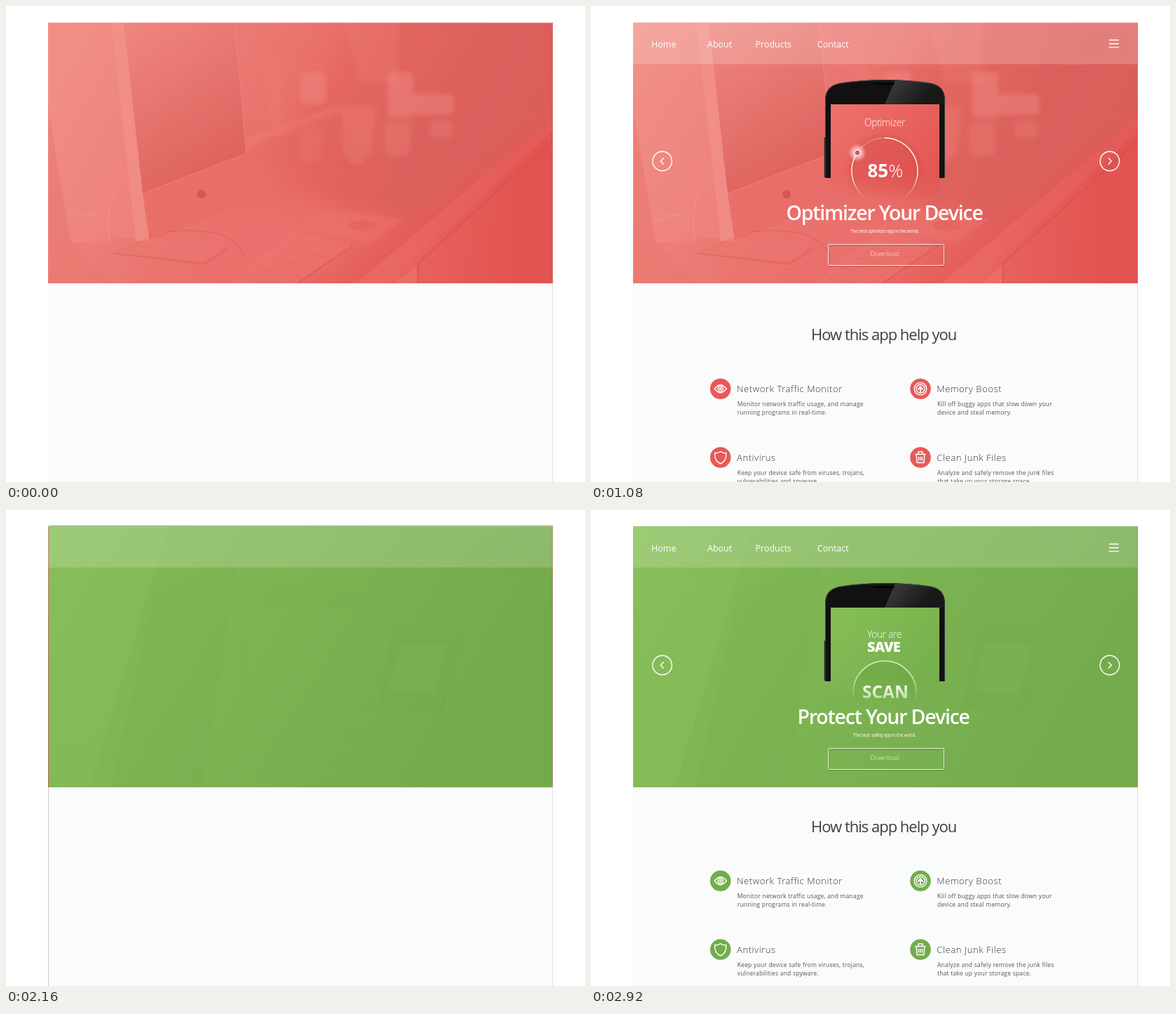
Recreate the animation shown at these times as an HTML page. Size 826x678 px, loop 3.88 s.

```html
<!DOCTYPE html>
<html lang="en">
<head>
<meta charset="utf-8">
<title>App landing page</title>
<style>
html, body { margin: 0; width: 100%; height: 100%; overflow: hidden; background: #fff; }
svg { display: block; font-family: "Open Sans", sans-serif; fill: none; }
text { fill: #fff; white-space: pre; }
.nav { font-size: 12.5px; }
.title { font-size: 28.5px; font-weight: 600; letter-spacing: -1.2px; }
.sub { font-size: 6.5px; letter-spacing: -.32px; }
.button { font-size: 9.2px; font-weight: 300; }
.heading { font-size: 22px; letter-spacing: -1px; fill: #3f3d40; }
.name { font-size: 13.1px; font-weight: 300; letter-spacing: .55px; fill: #333; }
.body { font-size: 8.5px; letter-spacing: .22px; fill: #555; }
.thin { font-size: 14px; font-weight: 300; letter-spacing: -.45px; }
.big { font-size: 26px; font-weight: 700; }
.line { stroke: #fff; stroke-width: 1.4; }
</style>
</head>
<body>
<svg id="stage" width="826" height="678" viewBox="0 0 826 678"></svg>
<script>
const LOOP = 3880, STEP = 40, SLIDE_START = 1760, SLIDE_TIME = 420;

const gradient = (id, from, to, x1, y1, x2, y2) =>
  `<linearGradient id="${id}" gradientUnits="userSpaceOnUse" x1="${x1}" y1="${y1}" x2="${x2}" y2="${y2}">
   <stop stop-color="${from}"/><stop offset="1" stop-color="${to}"/></linearGradient>`;
const blur = (id, size) =>
  `<filter id="${id}" x="-50%" y="-50%" width="200%" height="200%"><feGaussianBlur stdDeviation="${size}"/></filter>`;
const text = (cls, x, y, content, extra = '') => `<text class="${cls}" x="${x}" y="${y}" ${extra}>${content}</text>`;
const shape = (fill, d, opacity = 1) => `<path fill="${fill}" opacity="${opacity}" d="${d}"/>`;
const stroke = (color, d, opacity = 1, width = 1) =>
  `<path stroke="${color}" stroke-width="${width}" opacity="${opacity}" d="${d}"/>`;

const defs = `<defs>
  ${gradient('redHero', '#f08c84', '#e25351', 60, 60, 680, 400)}
  ${gradient('redScreenshot', '#ee857d', '#dc5f5b', 180, 30, 300, 240)}
  ${gradient('redWall', '#e66762', '#d9605c', 480, 30, 640, 130)}
  ${gradient('redDesk', '#ea6a66', '#e15350', 540, 330, 740, 330)}
  ${gradient('greenHero', '#86bd57', '#74ab4d', 60, 40, 640, 390)}
  ${gradient('redPhone', '#ee716c', '#e15451', 345, 140, 490, 270)}
  ${gradient('greenPhone', '#86be57', '#74ae4a', 345, 140, 490, 270)}
  ${gradient('shine', '#4b4b4b', '#1b1b1b', 430, 105, 470, 140)}
  ${gradient('fadeDown', '#fff', '#000', 0, 236, 0, 275)}
  ${gradient('scanText', '#fff', '#b4d695', 0, 248, 0, 272)}
  <linearGradient id="edge"><stop stop-color="#000" stop-opacity="0"/><stop offset="1" stop-color="#000" stop-opacity=".22"/></linearGradient>
  <radialGradient id="glow"><stop stop-color="#fff" stop-opacity=".9"/><stop offset=".35" stop-color="#fff" stop-opacity=".65"/><stop offset="1" stop-color="#fff" stop-opacity="0"/></radialGradient>
  <mask id="fade" maskUnits="userSpaceOnUse" x="330" y="90" width="180" height="200"><rect x="330" y="90" width="180" height="200" fill="url(#fadeDown)"/></mask>
  ${blur('soft', 3)}${blur('softer', 14)}
  <clipPath id="hero"><path d="M60 24H780V395H60Z"/></clipPath>
  <clipPath id="page"><path d="M60 22H780V678H60Z"/></clipPath>
</defs>`;

function keyboard() {
  let keys = '';
  for (let row = 0; row < 5; row++)
    keys += `M${412 - row * 19} ${330 + row * 14}l${74 - row * 3} 15`;
  for (let col = 0; col < 6; col++)
    keys += `M${420 + col * 13} ${331 + col * 2.6}l-82 60`;
  return stroke('#d95954', keys, .28);
}

// Tinted desk scene: monitor on the left, blurred objects and a table edge on the right.
const redBackdrop = `<g clip-path="url(#hero)">
  <rect x="60" y="24" width="720" height="371" fill="url(#redHero)"/>
  <g filter="url(#softer)">
    ${shape('url(#redWall)', 'M520 0H800V160L600 300L480 290L400 190Z', .8)}
    ${shape('#df605c', 'M345 200L470 150L560 280L440 300Z', .35)}
    ${shape('#ee7570', 'M300 300L420 270L560 310L420 400H220Z', .5)}
  </g>
  ${shape('#f4968d', 'M60 24H150L184 330L92 335L60 140Z', .28)}
  ${shape('#e9716b', 'M60 150L92 335L150 395H60Z', .3)}
  ${shape('#f3968e', 'M150 24H168L195 267L205 335H185Z', .65)}
  ${shape('url(#redScreenshot)', 'M168 24H326L343 210L195 267Z', .85)}
  ${shape('#e96d68', 'M195 267L343 210L348 278L205 335Z', .8)}
  ${stroke('#f28c85', 'M326 24L343 210M195 267L343 210', .6)}
  <circle cx="279" cy="268" r="6" fill="#c9504d" opacity=".75"/>
  ${shape('#df5d59', 'M152 350L212 326L318 345L284 368Z', .22)}
  ${shape('#f0807a', 'M155 351L215 328L314 343L282 364Z', .4)}
  ${stroke('#d75853', 'M152 352L282 368L318 346M225 322Q330 310 342 362', .5, 1.3)}
  ${stroke('#f6a39b', 'M148 334Q140 262 172 249M88 296L140 300M92 306L145 290M92 335H150', .4, 1.2)}
  ${shape('#f08079', 'M415 395L494 342L410 320L318 395Z', .25)}
  ${keyboard()}
  ${stroke('#d4534f', 'M416 395L494 342', .5, 2)}
  ${shape('#ee7771', 'M405 318L460 288L568 304L522 336Z', .35)}
  <ellipse cx="508" cy="313" rx="20" ry="8" fill="#df5a56" opacity=".4"/>
  <g filter="url(#soft)" fill="#f08882">
    <rect x="420" y="94" width="36" height="45" rx="6" opacity=".5"/>
    <rect x="544" y="94" width="37" height="65" rx="6" opacity=".5"/>
    <rect x="581" y="125" width="58" height="30" rx="6" opacity=".48"/>
    <path d="M480 143H528L522 210L500 228L480 210Z" opacity=".3"/>
    <rect x="540" y="164" width="37" height="50" rx="9" opacity=".28"/>
    <rect x="604" y="163" width="34" height="25" rx="6" opacity=".28"/>
    <rect x="418" y="172" width="34" height="50" rx="9" opacity=".2"/>
    <rect x="374" y="74" width="18" height="95" opacity=".18"/>
    <path d="M480 24H560V110H505Z" opacity=".22"/>
    <path d="M343 188L480 140V149L343 200Z" opacity=".35"/>
  </g>
  ${shape('url(#redDesk)', 'M500 395L780 158V395Z', .75)}
  ${shape('#ec6f6a', 'M500 395L780 158V178L545 395Z', .3)}
  ${stroke('#c94c4a', 'M588 366L780 192M588 366V395', .35, 2.5)}
  ${shape('#ef7d78', 'M556 395L586 370V395Z', .4)}
</g>
<path fill="#fafcfb" d="M60 395H780V678H60Z"/>
<path fill="#f4a39c" d="M60 23.5H780V24.3H60Z"/>`;

const greenBackdrop = `
<path fill="#fafcfb" d="M60 395H780V678H60Z"/>
<g>
  <rect x="60" y="23" width="720" height="372" fill="url(#greenHero)"/>
  <g clip-path="url(#hero)">
    ${shape('#9acb6e', 'M60 24H230L120 395H60Z', .12)}
    ${shape('#6fa548', 'M210 120L330 60L280 395H150Z', .12)}
    ${shape('#6da346', 'M553 164H650L620 288L530 278Z', .13)}
    ${shape('#83b95a', 'M562 192H628L612 262L544 256Z', .22)}
    ${stroke('#689e43', 'M530 278L620 288L650 178', .2, 2)}
  </g>
  <rect x="60" y="24" width="720" height="58" fill="#fff" opacity=".17"/>
  <path fill="#a3c883" d="M60 23H780V24H60Z"/>
</g>`;

const phoneBody = `
  ${shape('#111', 'M334 245V132Q335 114 354 110Q385 105 419 105Q455 105 486 110Q504 114 505 132V245H497V140H342V245Z')}
  ${shape('url(#shine)', 'M434 106Q462 106 485 110Q500 114 503 130V140H419Z', .75)}
  ${stroke('#4a4a4a', 'M334.500 245V132Q335.500 114.500 354 110.500Q385 105.700 419 105.700Q455 105.700 486 110.500Q503.500 114.500 504.500 132V245', .85)}
  <rect x="403" y="110" width="30" height="2" rx="1" fill="#000"/>
  <rect x="332.800" y="187" width="1.500" height="57" fill="#222"/>`;
const screenRect = fill => `<rect x="342" y="140" width="155" height="136" fill="url(#${fill})"/>`;

const redPhone = `${phoneBody}
  <g mask="url(#fade)">
    ${screenRect('redPhone')}
    <circle cx="419" cy="235" r="49" stroke="#b8383a" stroke-width="4" opacity=".35" filter="url(#soft)"/>
    <circle cx="419" cy="235" r="47" fill="#cf4646" opacity=".32"/>
    <circle class="line" cx="419" cy="235" r="47" opacity=".25"/>
    <path class="line" d="M419 188A47 47 0 1 1 380 208.800" opacity=".95"/>
    <circle cx="380" cy="209" r="13" fill="url(#glow)"/>
    <circle cx="380" cy="209" r="4" fill="#d95653" stroke="#fff"/>
  </g>
  ${text('thin', 390, 171, 'Optimizer')}
  ${text('big', 394.5, 244, '85<tspan font-weight="300">%</tspan>')}`;

const greenPhone = `<g transform="translate(0 -1)">${phoneBody}
  <g mask="url(#fade)">
    ${screenRect('greenPhone')}
    <circle cx="419" cy="261" r="45" fill="#5f9a3b" opacity=".3"/>
    <circle cx="419" cy="261" r="45" stroke="#d8ecc6" stroke-width="1.4"/>
  </g></g>
  ${text('thin', 394, 182, 'Your are')}
  ${text('big', 394, 202, 'SAVE', 'style="font-size:20px;font-weight:800;letter-spacing:-.8px"')}
  ${text('big', 387, 267.5, 'SCAN', 'style="font-size:24.5px;fill:url(#scanText)"')}`;

const nav = [['Home', 86], ['About', 166], ['Products', 234.5], ['Contact', 322.8]]
  .map(([label, x]) => text('nav', x, 58.5, label)).join('')
  + '<path class="line" d="M739 48.500H753M739 53.700H753M739 58.900H753"/>';

const arrow = (x, dir) => `<circle class="line" cx="${x}" cy="221" r="13.700" stroke-width="1.600"/>
  <path class="line" stroke-width="1.600" d="M${x - 2 * dir} 216.500l${4.5 * dir} 4.500l${-4.5 * dir} 4.500"/>`;
const arrows = arrow(101.7, -1) + arrow(740, 1);

const button = `
  <rect x="339" y="341" width="165" height="30" rx="2" stroke="#000" stroke-width="2" opacity=".1"/>
  <rect x="338.500" y="339.500" width="165" height="30" rx="1.500" stroke="#fff" opacity=".8"/>
  ${text('button', 398.5, 356, 'Download', 'opacity=".9"')}`;

const icons = {
  eye: '<path d="M-8.500 0Q0-11 8.500 0Q0 11-8.500 0Z"/><circle r="3.800"/><circle r="1.500"/>',
  boost: '<circle r="8.800"/><circle r="6"/><path d="M0 5V-2M-3.500 1L0-3L3.500 1" stroke-width="2"/>',
  shield: '<path d="M0-8.500Q3.500-5.500 8-6.500Q9 5 0 9Q-9 5-8-6.500Q-3.500-5.500 0-8.500Z"/>',
  bin: '<path d="M-7.500-4.500H7.500M-5.800-4.500L-5 7.500H5L5.800-4.500M-3-5V-8H3V-5M-2.500-1V4.500M0-1V4.500M2.500-1V4.500"/>'
};
const feature = (x, y, color, icon, name, first, second) => `
  <g transform="translate(${x} ${y})">
    <circle r="14.800" fill="${color}"/><g class="line">${icons[icon]}</g>
    ${text('name', 23.3, 4.8, name)}${text('body', 24, 24.8, first)}${text('body', 24, 36.8, second)}
  </g>`;
const rowOne = (y, color) =>
  feature(184.7, y, color, 'eye', 'Network Traffic Monitor', 'Monitor network traffic usage, and manage', 'running programs in real-time.')
  + feature(470, y, color, 'boost', 'Memory Boost', 'Kill off buggy apps that slow down your', 'device and steal memory.');
const rowTwo = (y, color) =>
  feature(184.7, y, color, 'shield', 'Antivirus', 'Keep your device safe from viruses, trojans,', 'vulnerabilities and spyware.')
  + feature(470, y, color, 'bin', 'Clean Junk Files', 'Analyze and safely remove the junk files', 'that take up your storage space.');
const heading = y => text('heading', 314, y, 'How this app help you');

// [markup, start ms, rise px]
const redParts = [
  ['<rect x="60" y="24" width="720" height="59" fill="#fff" opacity=".2"/>', 0, 0],
  [nav, 60, 24],
  [redPhone, 410, 46],
  [arrows, 410, 30],
  [text('title', 278.5, 305, 'Optimizer Your Device'), 468, 15],
  [text('sub', 370, 323, 'The best optimizer app in the world.'), 498, 9],
  [button, 600, 16],
  [heading(476), 640, 20],
  [rowOne(545.3, '#e85957'), 660, 20],
  [rowTwo(643, '#e85957'), 680, 20]
];
const greenParts = [
  [nav, 2172, 20],
  [greenPhone, 2200, 44],
  [arrows, 2210, 30],
  [text('title', 294.5, 305, 'Protect Your Device'), 2262, 16],
  [text('sub', 374, 323, 'The best  safety app in the world.'), 2265, 15],
  [button, 2302, 16],
  [heading(459), 2440, 20],
  [rowOne(528.3, '#72ad4b'), 2480, 20],
  [rowTwo(626, '#72ad4b'), 2520, 20]
];
const group = parts => parts.map(([markup]) => `<g class="part">${markup}</g>`).join('');

const stage = document.getElementById('stage');
stage.innerHTML = `${defs}
  <g clip-path="url(#page)">
    ${redBackdrop}${group(redParts)}
    <circle id="ripple" cx="740" cy="221" fill="#fff"/>
    <g id="panel">
      <g id="shadow"><rect x="53" y="24" width="7" height="654" fill="url(#edge)"/>
        <rect x="60" y="22.500" width="720" height="1" fill="#1d3a10" opacity=".8"/></g>
      ${greenBackdrop}
    </g>
    ${group(greenParts)}
  </g>
  <path fill="#b9605d" opacity=".6" d="M779.300 23H780.200V395H779.300Z"/>
  <path fill="#dcdfde" d="M779.300 395H780.200V678H779.300Z"/>`;

const nodes = stage.querySelectorAll('.part');
const parts = [...redParts, ...greenParts].map(([, start, rise], i) => ({ node: nodes[i], start, rise }));
const [ripple, panel, shadow] = ['ripple', 'panel', 'shadow'].map(id => document.getElementById(id));

const clamp = x => Math.max(0, Math.min(1, x));
const bezier = (a, b, s) => 3 * a * s * (1 - s) ** 2 + 3 * b * s * s * (1 - s) + s ** 3;
// cubic-bezier(.25, .1, .25, 1)
function ease(x) {
  if (x <= 0 || x >= 1) return clamp(x);
  let low = 0, high = 1;
  for (let i = 0; i < 20; i++) {
    const mid = (low + high) / 2;
    if (bezier(.25, .25, mid) < x) low = mid; else high = mid;
  }
  return bezier(.1, 1, low);
}

function render(time) {
  for (const { node, start, rise } of parts) {
    const p = ease((time - start) / 400);
    node.setAttribute('opacity', p);
    node.setAttribute('transform', `translate(0 ${rise * (1 - p)})`);
  }
  const wave = clamp((time - 1280) / 360);
  ripple.setAttribute('r', 38 * (1 - (1 - wave) ** 2));
  ripple.setAttribute('opacity', .45 * (1 - wave));

  const slide = clamp((time - SLIDE_START) / SLIDE_TIME);
  panel.setAttribute('transform', `translate(${720 * (1 - ease(slide))} 0)`);
  panel.setAttribute('opacity', 1 - (1 - slide) ** 2);
  shadow.setAttribute('opacity', slide < 1 ? 1 : 0);
}

const begin = performance.now();
function tick() {
  const time = (performance.now() - begin) % LOOP;
  render(Math.floor(time / STEP) * STEP);
  requestAnimationFrame(tick);
}
tick();
</script>
</body>
</html>
```
